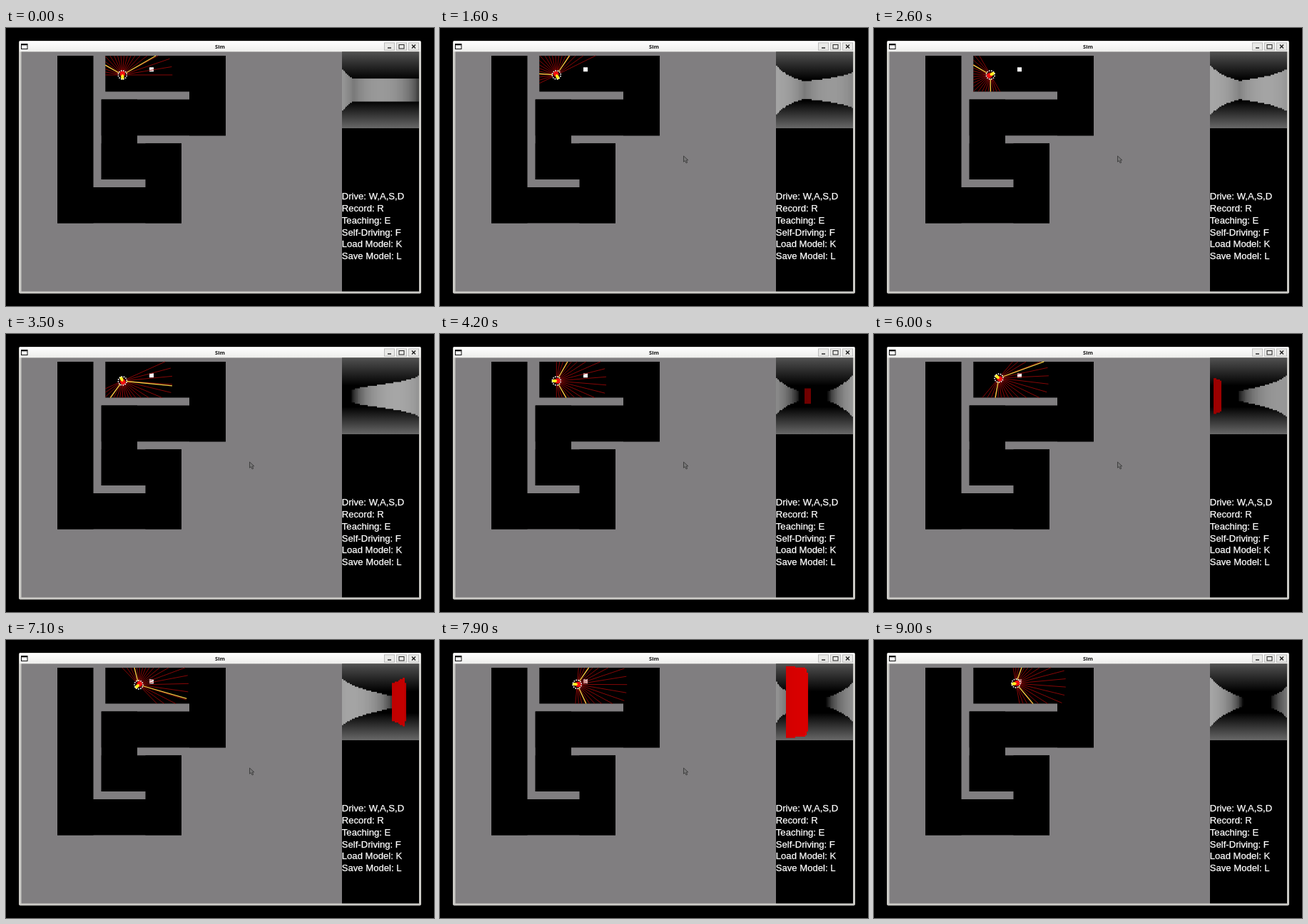
Recreate the animation shown at these times as an HTML page with a canvas. Size 600 by 391 pixels, loop 9100 ms.

```html
<!DOCTYPE html>
<html>
<head>
<meta charset="utf-8">
<style>
  html, body { margin: 0; width: 100%; height: 100%; overflow: hidden; background: #000; }
  canvas { display: block; width: 600px; height: 391px; }
</style>
</head>
<body>
<canvas id="stage" width="600" height="391"></canvas>
<script>
const g = document.getElementById('stage').getContext('2d');
const LOOP = 9100, STEP = 100, RANGE = 70, RAD = Math.PI / 180;
const VIEW = { x: 471, y: 34, w: 108, h: 107, mid: 87.3, cols: 60 };
const GOAL = { x: 201, y: 55.3, size: 6 };

// Open floor: left, top, right, bottom
const ROOMS = [
  [72, 39, 122.5, 274.5], [139.3, 39, 308, 89.5], [257, 39, 308, 151.3],
  [133.7, 100.5, 308, 151.3], [133.7, 100.5, 184, 213],
  [133.7, 162.3, 246, 213], [195.5, 162.3, 246, 274.5], [72, 224, 246, 274.5]
];

// Time, value
const HEADING = [
  [0, -90], [700, -60], [1000, -60], [4200, -360], [4800, -416], [5000, -413],
  [5300, -385], [6000, -320], [6200, -320], [7100, -404], [7200, -404],
  [7700, -350], [8100, -360], [8200, -360], [9000, -370]
];
const POS_X = [[4600, 163.3], [5200, 169], [6000, 175], [7100, 186], [8000, 193], [9000, 199]];
const POS_Y = [[4600, 66], [5200, 61.3], [6000, 62], [7100, 63], [8000, 62.3], [9000, 61]];
const CURSOR_Y = [[100, 362], [700, 188], [1100, 188], [1300, 180]];

function at(keys, t) {
  if (t <= keys[0][0]) return keys[0][1];
  for (let i = 1; i < keys.length; i++) {
    const [t0, a] = keys[i - 1], [t1, b] = keys[i];
    if (t <= t1) return a + (b - a) * (t - t0) / (t1 - t0);
  }
  return keys[keys.length - 1][1];
}

function rect(color, x, y, w, h) {
  g.fillStyle = color;
  g.fillRect(x, y, w, h);
}

function line(color, width, ...p) {
  g.strokeStyle = color;
  g.lineWidth = width;
  g.beginPath();
  for (let i = 0; i < p.length; i += 2) g.lineTo(p[i], p[i + 1]);
  g.stroke();
}

function disc(color, x, y, rx, ry = rx) {
  g.fillStyle = color;
  g.beginPath();
  g.ellipse(x, y, rx, ry, 0, 0, 7);
  g.fill();
}

const isOpen = (x, y) => ROOMS.some(r => x > r[0] && x < r[2] && y > r[1] && y < r[3]);
const inGoal = (x, y) => x > GOAL.x && x < GOAL.x + GOAL.size && y > GOAL.y && y < GOAL.y + GOAL.size;

function cast(car, angle, seeGoal) {
  const c = Math.cos(angle * RAD), s = Math.sin(angle * RAD);
  for (let d = 0; d < RANGE; d += 0.2) {
    const x = car.x + c * d, y = car.y + s * d;
    if (seeGoal && inGoal(x, y)) return { d, kind: 'goal' };
    if (!isOpen(x, y)) return { d, kind: 'wall' };
  }
  return { d: RANGE, kind: 'none' };
}

function drawWindow() {
  rect('#000', 0, 0, 600, 391);
  g.fillStyle = '#cbcac6';
  g.beginPath();
  g.roundRect(18, 18, 564, 355.5, 2);
  g.fill();
  const bar = g.createLinearGradient(0, 18, 0, 33);
  bar.addColorStop(0, '#fff');
  bar.addColorStop(1, '#eeeeec');
  rect(bar, 19, 18.5, 562, 14.8);

  rect('#111', 21, 22, 9.5, 8);
  rect('#f6f6f6', 22, 24.3, 7.5, 4.7);
  g.fillStyle = '#111';
  g.font = 'bold 7.6px "Open Sans", "DejaVu Sans", sans-serif';
  g.textAlign = 'center';
  g.fillText('Sim', 300, 28.6);

  for (const x of [530, 547, 564]) {
    rect('#aaa', x, 20.5, 15, 11);
    rect('#e9e9e7', x + 0.7, 21.2, 13.6, 9.6);
  }
  rect('#222', 535, 27.3, 5, 1.4);
  g.strokeStyle = '#222';
  g.lineWidth = 1;
  g.strokeRect(551, 23.5, 7, 5.5);
  line('#222', 1.4, 569, 23.6, 574, 28.6);
  line('#222', 1.4, 574, 23.6, 569, 28.6);

  rect('#807e80', 21.5, 33.5, 449.5, 337);
  rect('#000', 471, 33.5, 108, 337);
  for (const [l, t, r, b] of ROOMS) rect('#000', l, t, r - l, b - t);
}

function drawText() {
  g.fillStyle = g.strokeStyle = '#fff';
  g.font = '13.1px "Liberation Sans", Arial, sans-serif';
  g.textAlign = 'left';
  g.lineWidth = 0.25;
  ['Drive: W,A,S,D', 'Record: R', 'Teaching: E', 'Self-Driving: F',
    'Load Model: K', 'Save Model: L'].forEach((s, i) => {
    g.fillText(s, 470.8, 241 + i * 16.85);
    g.strokeText(s, 470.8, 241 + i * 16.85);
  });
}

function drawCar(car) {
  const end = (angle) => {
    const { d } = cast(car, angle, false);
    return [car.x + Math.cos(angle * RAD) * d, car.y + Math.sin(angle * RAD) * d];
  };
  for (let i = 0; i < 20; i++) {
    line('#960808', 0.9, car.x, car.y, ...end(car.a - 90 + i * 180 / 19));
  }
  for (const side of [-60, 60]) line('#f5cf45', 1.3, car.x, car.y, ...end(car.a + side));

  g.save();
  g.translate(car.x, car.y);
  g.rotate(car.a * RAD);
  disc('#180000', 0, 0, 5.6);
  disc('#f01010', 1.8, 0, 3.7);
  disc('#ffee20', -3, 0, 3.7, 2.2);
  for (let i = 0; i < 12; i++) {
    const a = (i + 0.5) * Math.PI / 6;
    rect('#fff', Math.cos(a) * 6 - 0.8, Math.sin(a) * 6 - 0.8, 1.6, 1.6);
  }
  rect('#e00', -1, -3.3, 1.6, 1.6);
  rect('#e00', -1, 1.8, 1.6, 1.6);
  g.restore();
}

function drawView(car) {
  const { x, y, w, h, mid, cols } = VIEW;
  const shade = g.createLinearGradient(0, y, 0, y + h);
  shade.addColorStop(0, '#505050');
  shade.addColorStop(0.36, '#000');
  shade.addColorStop(0.64, '#000');
  shade.addColorStop(1, '#686868');
  rect(shade, x, y, w, h);

  g.save();
  g.beginPath();
  g.rect(x, 33.5, w, 157);
  g.clip();
  const seeGoal = car.x < 198;
  for (let i = 0; i < cols; i++) {
    const off = -60 + (i + 0.5) * 120 / cols;
    const hit = cast(car, car.a + off, seeGoal);
    if (hit.kind === 'none') continue;
    const half = Math.round(418 / Math.max(hit.d * Math.cos(off * RAD), 1) / 1.8) * 1.8;
    const v = Math.round(250 * (1 - hit.d / RANGE));
    const left = Math.round(x + i * w / cols), right = Math.round(x + (i + 1) * w / cols);
    rect(hit.kind === 'goal' ? `rgb(${v},0,0)` : `rgb(${v},${v},${v})`,
      left, mid - half, right - left, half * 2);
  }
  g.restore();
}

function drawCursor(t) {
  if (t < 100 || t >= 8100) return;
  const x = 341.5, y = at(CURSOR_Y, t);
  g.beginPath();
  for (const [dx, dy] of [[0, 0], [0, 8.2], [2, 6.6], [3.7, 10], [5.2, 9.2], [3.8, 6], [6.3, 5.8]]) {
    g.lineTo(x + dx, y + dy);
  }
  g.closePath();
  g.fillStyle = '#777';
  g.fill();
  g.strokeStyle = '#333';
  g.lineWidth = 0.8;
  g.stroke();
}

function draw(t) {
  const car = { x: at(POS_X, t), y: at(POS_Y, t), a: at(HEADING, t) };
  drawWindow();
  rect('#fff', GOAL.x, GOAL.y, GOAL.size, GOAL.size);
  drawCar(car);
  drawView(car);
  drawText();
  drawCursor(t);
}

let last = -1;
function tick() {
  const t = Math.floor(performance.now() % LOOP / STEP) * STEP;
  if (t !== last) draw(last = t);
  requestAnimationFrame(tick);
}
tick();
</script>
</body>
</html>
```
